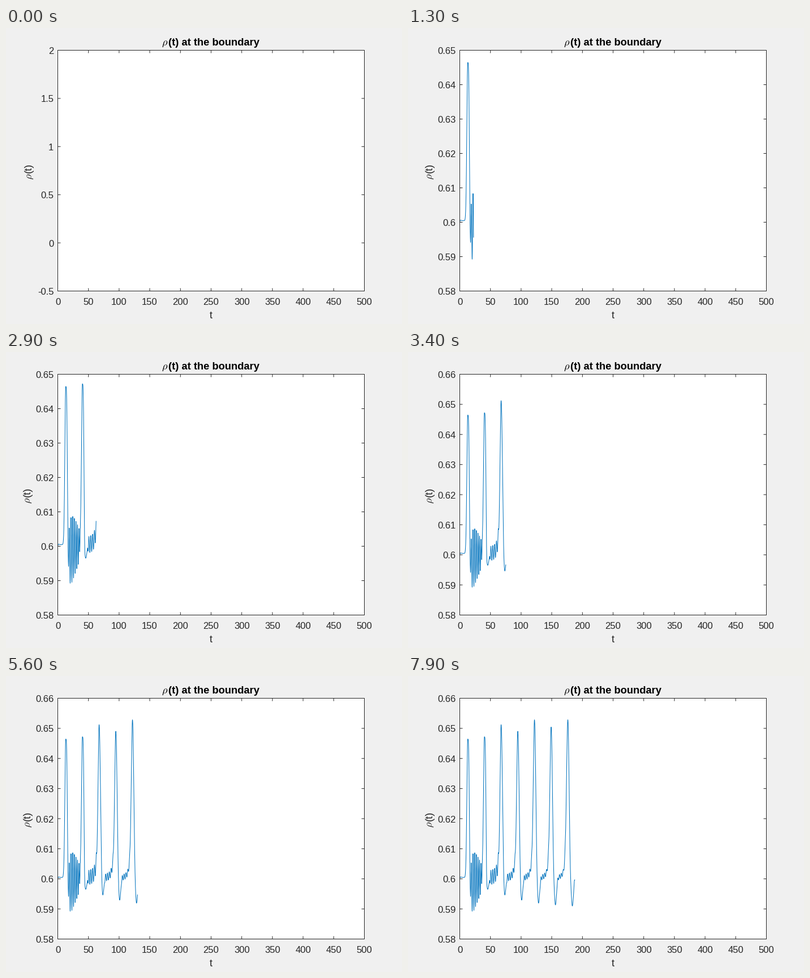
Recreate the animation shown at these times as a matplotlib script. Size 700 by 525 pixels, loop 8000 ms.

```python
import math

import matplotlib.pyplot as plt
import numpy as np
from matplotlib.animation import FuncAnimation
from matplotlib.collections import LineCollection
from matplotlib.patches import Rectangle

plt.rcParams["font.family"] = "Liberation Sans"
plt.rcParams["mathtext.fontset"] = "cm"

W, H, DPI = 700, 525, 100
LEFT, RIGHT, TOP, BOTTOM = 91.5, 633.5, 39.5, 466.5
INK, BLUE = "#262626", "#0072BD"
PX = 72 / DPI
TICK = 5
SMALL, BIG = 16.67, 18.33

FIRST, PERIOD = 13, 27.2
HEIGHTS = [46, 46.8, 50.8, 48.6, 52.4, 50, 52.4]


def window(x, start, end):
    """Smooth gate that is open between start and end."""
    return 1 / (1 + np.exp(-3 * (x - start))) / (1 + np.exp(3 * (x - end)))


def bell(x, k):
    """Peak whose crest goes from shouldered to symmetric as k grows."""
    width = np.where(x < 0, 1.7 + .12 * k, 2.6 - .04 * k)
    power = np.where(x < 0, 2, 4 if k < 2 else 2.2)
    return np.exp2(-np.abs(x / width) ** power)


def ringing(x):
    """Fast oscillation behind the first peak, rising quickly, fading slowly."""
    s = np.clip(x - 4.3, 0, 20)
    size = 13 * (1 - np.exp(-(s + 1) / 2.6)) * (1 - s / 28)
    wave = -size * np.cos(math.pi * s * (.673 + .0042 * s))
    return window(x, 4, 23) * (wave - 3.5 * np.exp(-s / 6))


def wake(x, k):
    """Dip and ripples behind a later peak."""
    depth = 10 * (1 - math.exp(-k / 2))
    dip = depth * np.exp(-((x - 5 - .4 * k) / 1.8) ** 2 / 2)
    ripple = (.6 + 1.8 / k ** 1.5) * np.cos(2 * math.pi * (x - 16.6) / 3)
    return window(x, 9, 23.5) * ripple - dip


def density(t):
    """Thousandths above 0.6: a start-up step, then a train of peaks."""
    y = .45 * (1 - np.exp(-2 * t)) + .5 * t * np.exp(-t)
    for k, height in enumerate(HEIGHTS):
        x = t - FIRST - PERIOD * k
        peak = bell(x, k)
        y += height * peak + (wake(x, k) if k else ringing(x))
        if k > 1:
            ramp = 5 * np.exp(np.minimum(x + 4.5, 0) / 3)
            y += np.where(x < 0, ramp * (1 - peak), 0)
    return .6 + y / 1000


def nice_ticks(lo, hi):
    span = hi - lo
    power = 10 ** (math.floor(math.log10(span)) - 1)
    step = next(k * power for k in (1, 2, 5, 10) if span / (k * power) <= 10)
    first = math.floor(lo / step + 1e-6)
    last = math.ceil(hi / step - 1e-6)
    return [round(k * step, 8) for k in range(first, last + 1)]


T = np.linspace(0, 187.5, 3751)
RHO = density(T)

fig = plt.figure(figsize=(W / DPI, H / DPI), dpi=DPI, facecolor="#F0F0F0")
ax = fig.add_axes([0, 0, 1, 1])
ax.set_xlim(0, W)
ax.set_ylim(H, 0)
ax.axis("off")


def label(x, y, s, size, **kw):
    kw = {"color": INK, "va": "baseline", **kw}
    return ax.text(x, y, s, fontsize=size * PX, **kw)


def to_x(t):
    return LEFT + t / 500 * (RIGHT - LEFT)


def frame(**kw):
    ax.add_patch(Rectangle((LEFT, TOP), RIGHT - LEFT, BOTTOM - TOP,
                           linewidth=PX, snap=False, **kw))


def segments():
    lines = LineCollection([], colors=INK, linewidths=PX, zorder=4)
    lines.set_snap(False)
    return ax.add_collection(lines)


frame(facecolor="white", edgecolor="none", zorder=1)
frame(facecolor="none", edgecolor=INK, zorder=4)
curve, = ax.plot([], [], color=BLUE, linewidth=PX, zorder=3, snap=False)

x_marks = []
for t in range(0, 501, 50):
    x = to_x(t)
    x_marks += [[(x, BOTTOM), (x, BOTTOM - TICK)], [(x, TOP), (x, TOP + TICK)]]
    label(x, 491, str(t), SMALL, ha="center")
segments().set_segments(x_marks)
y_marks = segments()
y_labels = [label(84.5, 0, "", SMALL, ha="right") for _ in range(13)]

label(275, 31, r"$\rho$", BIG, color="black")
label(287.2, 31, "(t) at the boundary", BIG, color="black", weight="bold")
label(362.5, 515, "t", BIG, ha="center")
upright = dict(rotation=90, rotation_mode="anchor", ha="left")
y_title = [label(0, 269, r"$\rho$", BIG, **upright),
           label(0, 257, "(t)", BIG, **upright)]


def text_width(s):
    return SMALL * sum({".": .278, "-": .42}.get(c, .556) for c in s)


def draw(i):
    n = 50 * (i - 4) + 1 if i > 4 else 0
    if n:
        ticks = nice_ticks(RHO[:n].min(), RHO[:n].max())
    else:
        ticks = [k / 2 for k in range(-1, 5)]
    lo, hi = ticks[0], ticks[-1]

    def to_y(v):
        return BOTTOM - (v - lo) / (hi - lo) * (BOTTOM - TOP)

    curve.set_data(to_x(T[:n]), to_y(RHO[:n]))
    marks = []
    for k, text in enumerate(y_labels):
        if k < len(ticks):
            y = to_y(ticks[k])
            marks += [[(LEFT, y), (LEFT + TICK, y)],
                      [(RIGHT, y), (RIGHT - TICK, y)]]
            text.set_text(f"{ticks[k]:g}")
            text.set_y(y + 6.5)
        else:
            text.set_text("")
    y_marks.set_segments(marks)
    widest = max(text_width(f"{v:g}") for v in ticks)
    for text in y_title:
        text.set_x(84 - widest - 8.5)
    return [curve, y_marks, *y_labels, *y_title]


anim = FuncAnimation(fig, draw, frames=80, interval=100, repeat=True,
                     repeat_delay=0, blit=False)
plt.show()
```
